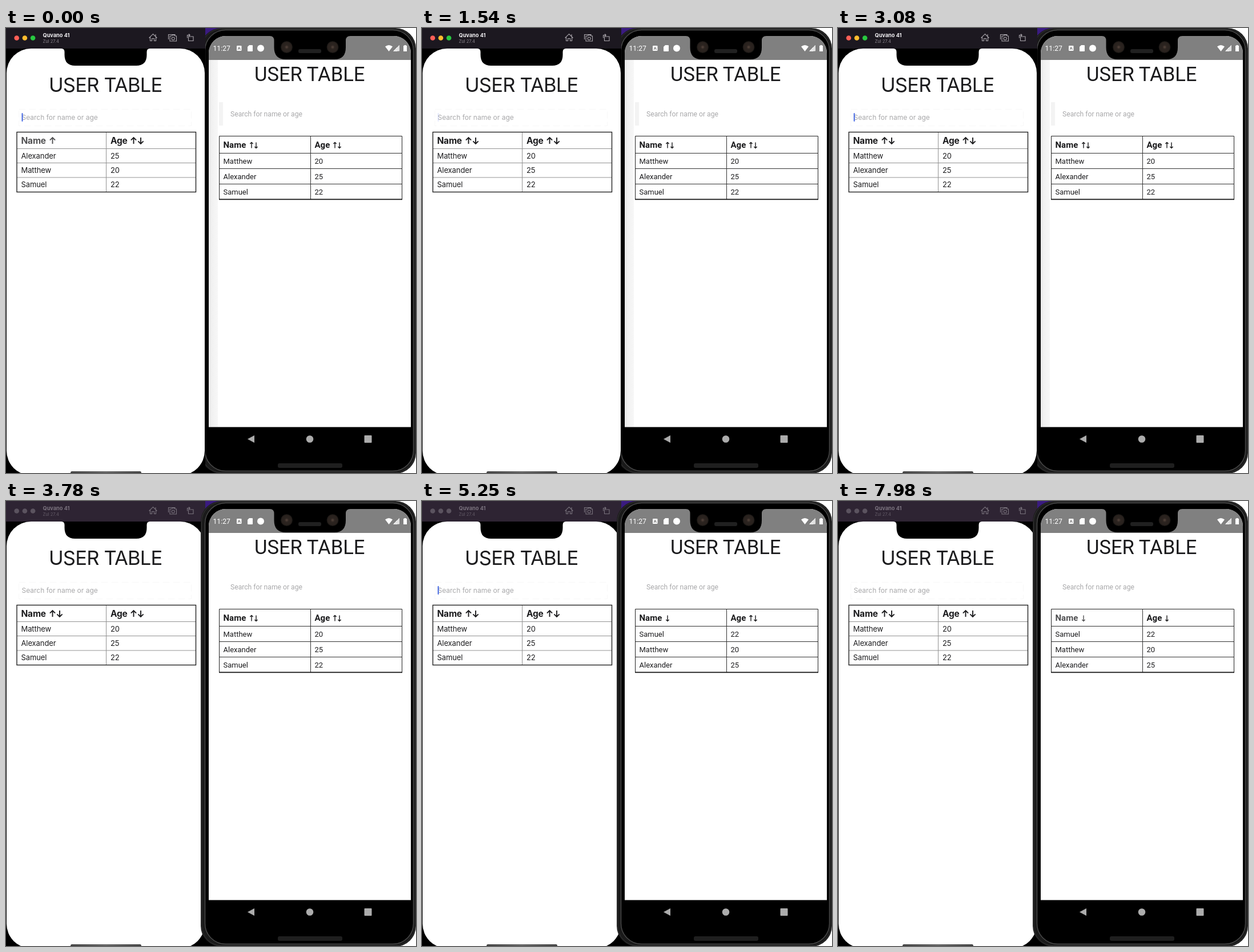
Animation, 718 px wide and 780 px high, one loop 8000 ms. Source, as an HTML page:

```html
<!DOCTYPE html>
<html lang="en">
<head>
<meta charset="utf-8">
<title>User table</title>
<style>
  html, body { margin: 0; width: 100%; height: 100%; overflow: hidden; background: #000; }
  svg { display: block; width: 100vw; height: 100vh; }
  .ios { font-family: Inter, "Open Sans", sans-serif; fill: #1c1c1e; }
  .droid { font-family: Roboto, "Noto Sans", sans-serif; fill: #1a1a1c; }
  .hint { font-size: 12px; fill: #a8a8aa; }
  .ios .title { font-size: 34.5px; letter-spacing: -.8px; }
  .droid .title { font-size: 34.6px; }
  .ios .head { font-size: 15.5px; font-weight: 700; letter-spacing: -.2px; }
  .droid .head { font-size: 15px; font-weight: 700; }
  .ios .cell { font-size: 13px; letter-spacing: -.1px; }
  .droid .cell { font-size: 13px; }
  .droid .hint { font-size: 12.15px; }
  .arrow { fill: none; stroke: #1c1c1e; }
  .icon { fill: none; stroke: #a9a5ab; stroke-width: 1.1; }
</style>
</head>
<body>
<svg viewBox="0 0 718 780" preserveAspectRatio="none">
  <defs>
    <clipPath id="behind"><rect x="349" y="0" width="369" height="780"/></clipPath>
    <clipPath id="glass"><rect x="355" y="14" width="354" height="725" rx="30"/></clipPath>
    <linearGradient id="shade">
      <stop offset="0" stop-color="#e6e6e6"/><stop offset=".25" stop-color="#f0f0f0"/>
      <stop offset="1" stop-color="#f7f7f7"/>
    </linearGradient>
    <linearGradient id="bar">
      <stop offset="0" stop-color="#444"/><stop offset=".5" stop-color="#666"/>
      <stop offset="1" stop-color="#444"/>
    </linearGradient>
    <radialGradient id="lens">
      <stop offset="0" stop-color="#54443c"/><stop offset=".35" stop-color="#2c2420"/>
      <stop offset=".8" stop-color="#29221e"/><stop offset="1" stop-color="#151311"/>
    </radialGradient>
  </defs>
  <rect width="718" height="780" fill="#000"/>
  <rect x="340" width="340" height="60" fill="#3a1b80"/>
  <rect x="680" width="38" height="780" fill="#fff"/>

  <g class="ios">
    <rect y="30" width="349" height="750" fill="#000"/>
    <rect id="titlebar" width="349" height="36" fill="#1c1820"/>
    <g id="lights"></g>
    <text id="device" x="64.500" y="16" font-size="9.200" font-weight="700">Quvano 41</text>
    <text id="system" x="64.500" y="26" font-size="7.600">Zul 27.4</text>
    <g id="tools" class="icon">
      <path d="M250.500 17.500L257.500 10.500L264.500 17.500M252.500 16V22.500H255.500V18.500H259.500V22.500H262.500V16M262 11V14.500"/>
      <path d="M284.500 20V11.500H296V13M287 14H290L291 12.500H295L296 14H298.500V23H287Z"/>
      <circle cx="292.700" cy="18.500" r="2.500"/>
      <path d="M319.500 15H328V22.500H319.500ZM317.500 17.500V12.500H322M320 10.500L322.200 12.500L320 14.500"/>
    </g>
    <rect x="1" y="36" width="347" height="748" rx="43" fill="#fff"/>
    <path d="M97 36Q102.500 36 102.500 42V47Q102.500 66 121 66H228Q246.500 66 246.500 47V42Q246.500 36 252 36Z" fill="#000"/>
    <rect x="113" y="777" width="124" height="5" rx="2.500" fill="url(#bar)"/>
    <text class="title" x="75" y="112">USER TABLE</text>
    <rect x="22.500" y="142.500" width="302" height="29" fill="none" stroke="#f8f8f8" stroke-dasharray="12 6"/>
    <text class="hint" x="27.500" y="161">Search for name or age</text>
    <rect id="caret" x="27.500" y="149" width="2" height="15" rx="1" fill="#4468e4"/>
    <path d="M19 211.500H332M19 236.500H332M19 262H332M175.500 183V287" stroke="#929292" fill="none"/>
    <rect x="19" y="182.500" width="313.500" height="105" fill="none" stroke="#222" stroke-width="1.400"/>
    <g id="leftTable"></g>
  </g>

  <g id="phone" class="droid">
    <rect x="341" y="0" width="377" height="781" rx="36" fill="#1a1a1a"/>
    <rect x="342.500" y="1.500" width="374" height="778" rx="35" fill="none" stroke="#333"/>
    <rect x="348.500" y="3.500" width="365" height="773" rx="36" fill="#000" stroke="#4a4a4a" stroke-width="1.400"/>
    <g clip-path="url(#glass)">
      <rect x="355" y="14" width="354" height="685.500" fill="#fff"/>
      <g id="shadow">
        <rect x="355" y="56" width="16" height="643" fill="url(#shade)"/>
        <rect x="373" y="130" width="7" height="41" fill="#f3f3f3"/>
      </g>
      <rect x="355" y="14" width="354" height="42" fill="#808080"/>
    </g>
    <path d="M462 14Q469.500 14 469.500 22V34Q469.500 55 490 55H575Q595 55 595 34V22Q595 14 603 14Z" fill="#000"/>
    <circle cx="491.500" cy="33.500" r="10.500" fill="url(#lens)"/>
    <circle cx="572" cy="33.500" r="10.500" fill="url(#lens)"/>
    <rect x="512" y="37" width="40" height="7" rx="3" fill="#202020"/>
    <rect x="476" y="763" width="113" height="8" rx="3" fill="#1f1f1f"/>
    <g fill="#fff">
      <text x="362.500" y="40" font-size="12.200">11:27</text>
      <rect x="404" y="31" width="8.500" height="9" rx="1"/>
      <path d="M406 38L408.200 33L410.500 38M407 36.500H409.500" fill="none" stroke="#777"/>
      <path d="M426 30H431Q432 30 432 31V40Q432 41 431 41H424Q423 41 423 40V33Z"/>
      <circle cx="446" cy="35.500" r="6"/>
      <path d="M664 32.500Q670.500 27.500 677 32.500L670.500 41Z"/>
      <path d="M689 30V40.500H678.500Z" fill-opacity=".45"/>
      <path d="M685 34V40.500H678.500ZM688.500 30.500V40H680Z" stroke="#fff" stroke-width=".6" fill-opacity=".5"/>
      <path d="M697.500 30H700.500V31H702V41H696V31H697.500Z"/>
    </g>
    <g fill="#acacac">
      <path d="M423 720.500L435 714V727Z"/>
      <circle cx="532" cy="720.500" r="6.300"/>
      <rect x="627.500" y="714" width="13" height="13" rx="1"/>
    </g>
    <text class="title" x="435" y="93">USER TABLE</text>
    <text class="hint" x="393" y="155">Search for name or age</text>
    <path d="M373 219.500H694M373 246.500H694M373 273.500H694M533.500 189V300" stroke="#333" fill="none"/>
    <path d="M373.500 300V189.500H693.500V300" stroke="#222" fill="none"/>
    <path d="M373 300.300H694" stroke="#111" stroke-width="1.800"/>
    <g id="rightTable"></g>
  </g>
</svg>
<script>
const LOOP = 8000, STEP = 70, FOCUS = 3290;
const $ = id => document.getElementById(id);
const USERS = [["Matthew", 20], ["Alexander", 25], ["Samuel", 22]];

// Each entry: time, name arrows, age arrows, row order, pressed column
const LEFT = [
  [0, "u", "ud", "102", 0], [210, "d", "ud", "201"],
  [770, "d", "ud", "201", 0], [910, "ud", "ud", "012", 0], [1050, "ud", "ud", "012"],
  [1680, "ud", "ud", "012", 1], [1820, "ud", "u", "021", 1], [1960, "ud", "u", "021"],
  [2100, "ud", "u", "021", 1], [2240, "ud", "d", "120"],
  [2450, "ud", "d", "120", 1], [2590, "ud", "ud", "012", 1], [2660, "ud", "ud", "012"]
];
const RIGHT = [
  [0, "ud", "ud", "012"],
  [4200, "ud", "ud", "012", 0], [4270, "u", "ud", "102", 0], [4480, "u", "ud", "102"],
  [4970, "u", "ud", "102", 0], [5110, "d", "ud", "201", 0], [5180, "d", "ud", "201"],
  [5880, "d", "ud", "201", 1], [6020, "d", "u", "201", 1], [6160, "d", "u", "201"],
  [6440, "d", "u", "201", 1], [6720, "d", "d", "201", 1], [6930, "d", "d", "201"],
  [7910, "d", "d", "201", 0]
];
const CARET_OUT = [420, 1400, 2450, 3430, 4410, 5530, 6720, 7770];
const CARET_IN = [-300, 840, 1820, 2870, 3850, 4900, 6020, 7070];

const IOS = { cols: [26.5, 183], arrows: [81.5, 223.5], gap: 12.5, headY: 203, rowY: 228.5,
  pitch: 25.2, top: 192, size: 11, wing: 4.6, stroke: 1.9 };
const DROID = { cols: [380.5, 540.5], arrows: [430, 576], gap: 8, headY: 210.4, rowY: 238.4,
  pitch: 27, top: 200.5, size: 10, wing: 2.6, stroke: 1.4 };

const last = (list, ok) => list.filter(ok).pop();
const clamp = v => Math.max(0, Math.min(1, v));
const text = (cls, x, y, s) => `<text class="${cls}" x="${x}" y="${y}">${s}</text>`;

function arrow(dir, x, o) {
  const end = o.top + o.size;
  const [tip, back] = dir === "u" ? [o.top, o.wing] : [end, -o.wing];
  return `<path class="arrow" stroke-width="${o.stroke}" d="M${x} ${o.top}V${end}` +
    `M${x - o.wing} ${tip + back}L${x} ${tip}L${x + o.wing} ${tip + back}"/>`;
}

function table([, name, age, order, pressed], o) {
  const heads = [["Name", name], ["Age", age]].map(([label, dirs], i) =>
    `<g opacity="${pressed === i ? .76 : 1}">` + text("head", o.cols[i], o.headY, label) +
    [...dirs].map((d, k) => arrow(d, o.arrows[i] + k * o.gap, o)).join("") + "</g>");
  const rows = [...order].map((u, r) => USERS[u].map((value, c) =>
    text("cell", o.cols[c], o.rowY + r * o.pitch, value)).join(""));
  return heads.concat(rows).join("");
}

function caret(t) {
  const shown = last(CARET_IN, s => s <= t);
  const hidden = last(CARET_OUT, s => s <= t) ?? -1e4;
  return shown > hidden ? clamp((t - shown + 70) / 210) : clamp(1 - (t - hidden + 30) / 200);
}

const drawn = {};
function fill(id, markup) {
  if (drawn[id] !== markup) $(id).innerHTML = drawn[id] = markup;
}

function draw(time) {
  const t = Math.floor(time / STEP) * STEP;
  const front = t < FOCUS;
  const colors = front ? ["#ff5f57", "#febc2e", "#28c840"] : Array(3).fill("#5b535f");
  fill("lights", colors.map((c, i) =>
    `<circle cx="${18.7 + i * 14.2}" cy="17.500" r="4.300" fill="${c}"/>`).join(""));
  $("titlebar").setAttribute("fill", front ? "#1c1820" : "#2e2433");
  $("device").setAttribute("fill", front ? "#f2f0f3" : "#7b737f");
  $("system").setAttribute("fill", front ? "#89848c" : "#635b67");
  $("tools").setAttribute("opacity", front ? 1 : .6);
  $("shadow").setAttribute("opacity", front ? 1 : 0);
  $("phone").setAttribute("clip-path", front ? "url(#behind)" : "none");
  $("caret").setAttribute("opacity", caret(t));
  fill("leftTable", table(last(LEFT, s => s[0] <= t), IOS));
  fill("rightTable", table(last(RIGHT, s => s[0] <= t), DROID));
}

const start = performance.now();
function tick() {
  draw((performance.now() - start) % LOOP);
  requestAnimationFrame(tick);
}
tick();
</script>
</body>
</html>
```
